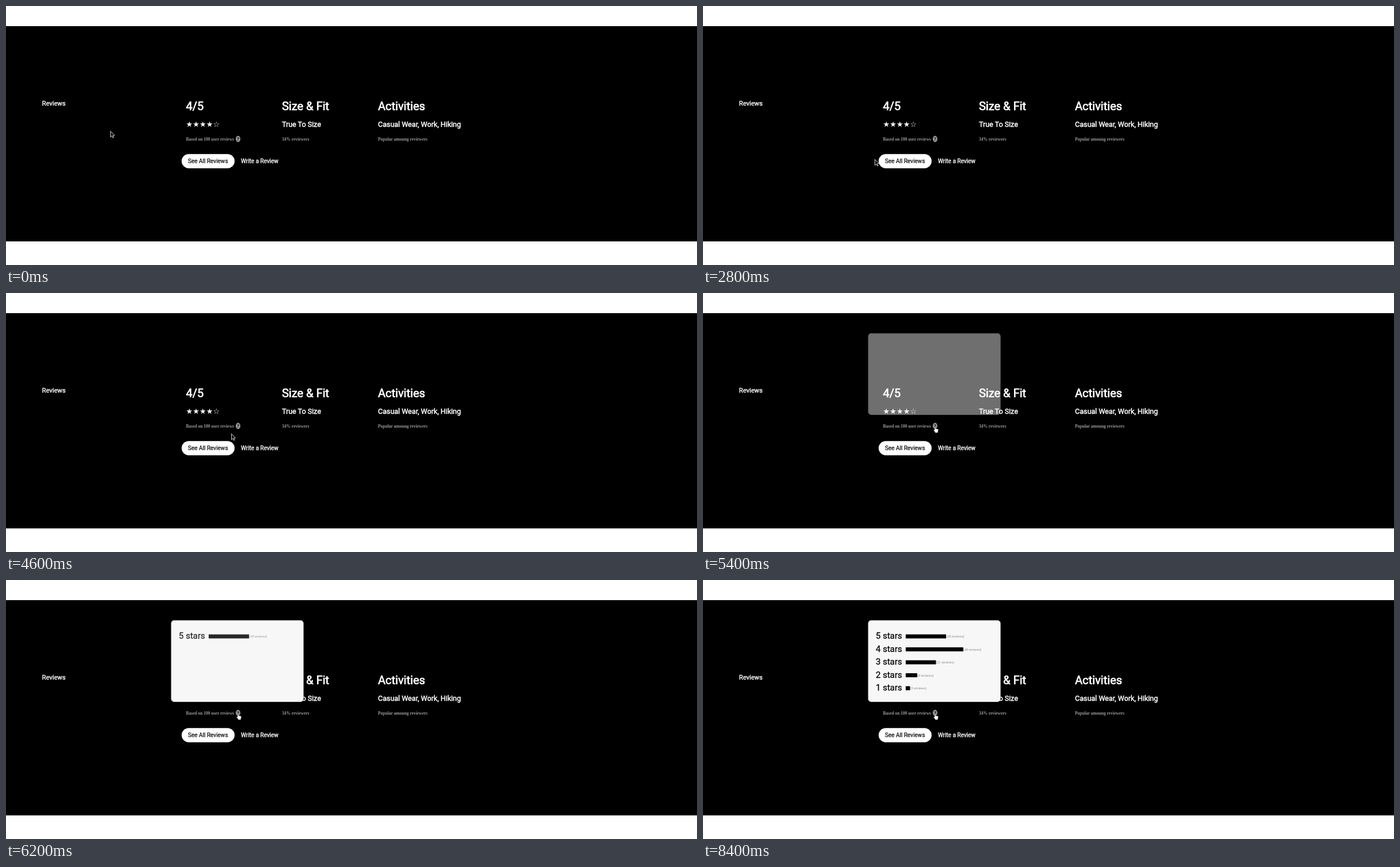
An HTML page for the animation above (9590 ms loop, 1200x450 px).

```html
<!DOCTYPE html>
<html lang="en">
<head>
<meta charset="utf-8">
<title>Reviews</title>
<style>
  html, body { margin: 0; width: 100%; height: 100%; overflow: hidden; background: #fff; }
  svg { display: block; width: 100vw; height: 100vh; }
  text { white-space: pre; }
  .sans { font-family: Roboto, "Liberation Sans", sans-serif; fill: #fff; }
  .bold { stroke: #fff; stroke-width: .036em; }
  .h1 { font-size: 20px; }
  .h2 { font-size: 12.5px; }
  .link { font-size: 10px; }
  .note { font: bold 7.5px "Liberation Serif", serif; fill: #999; }
  .stars { font: 13.1px "DejaVu Sans", sans-serif; fill: #fff; }
  .row { font-size: 15px; fill: #000; stroke: #000; stroke-width: .018em; }
  .count { font: 6.25px "Liberation Serif", serif; fill: #808080; }
</style>
</head>
<body>
<svg id="stage" viewBox="0 0 1200 450">
  <rect y="35" width="1200" height="374"/>
  <text class="sans bold" font-size="11.2" x="62.5" y="173">Reviews</text>

  <text class="sans bold h1" x="312.5" y="181">4/5</text>
  <text class="stars" x="312.5" y="209.5">★★★★☆</text>
  <text class="note" x="312.5" y="233.7">Based on 100 user reviews</text>
  <ellipse cx="403" cy="231" rx="4" ry="5.4" fill="#999"/>
  <text x="403" y="234.2" text-anchor="middle" font-size="9" font-weight="bold" font-family="Liberation Serif, serif">?</text>

  <text class="sans bold h1" x="479.2" y="181">Size &amp; Fit</text>
  <text class="sans bold h2" x="479.2" y="209.5">True To Size</text>
  <text class="note" x="479.2" y="233.7">34% reviewers</text>

  <text class="sans bold h1" x="646" y="181">Activities</text>
  <text class="sans bold h2" x="646" y="209.5">Casual Wear, Work, Hiking</text>
  <text class="note" x="646" y="233.7">Popular amoung reviewers</text>

  <g id="button">
    <rect x="305" y="257.2" width="92" height="24.8" rx="12.4" fill="#fff"/>
    <text class="sans link" x="316" y="273" style="fill:#000;stroke:#000;stroke-width:.02em">See All Reviews</text>
  </g>
  <text class="sans bold link" x="408" y="273">Write a Review</text>

  <g id="popup">
    <rect x="287" y="70.3" width="229.4" height="141.2" rx="5" fill="#f7f7f7" stroke="#ccc" stroke-width=".85"/>
  </g>

  <path id="arrow" d="M.5 .5V10.8L2.9 8.6L4.5 12.1L6.1 11.4L4.6 8H7.6Z" fill="#111" stroke="#ddd" stroke-width=".9"/>
  <path id="hand" d="M-1 7V1.2A1 1 0 0 1 1.1 1.2V4.6L4.8 5.3Q6 5.7 5.9 7.2L5 10.2V12H-.2V10.6L-2.8 7.6Q-2.8 6.2-1 7Z" fill="#fff" stroke="#000" stroke-width=".7"/>
</svg>
<script>
const LOOP = 9590, STEP = 1000 / 15;
const HOVER_ON = 2867, HOVER_OFF = 4200, HOVER_TIME = 250;
const POPUP_AT = 5265, ROWS_AT = 5935, FADE = 500;
const counts = [28, 40, 21, 8, 3];

// time, x, y of the pointer tip
const path = [
  [0, 180.5, 216.5], [867, 180.5, 216.5], [933, 181.5, 216], [1000, 181.5, 215],
  [1200, 181.5, 215], [1700, 205, 188], [2200, 231, 207], [2800, 298, 266],
  [3130, 350, 268], [3550, 350, 268], [4200, 380, 257], [4530, 390, 246],
  [4600, 390.5, 244.3], [5180, 403, 231], [LOOP, 403, 231]
];

const $ = id => document.getElementById(id);
const clamp = v => Math.max(0, Math.min(1, v));

function add(parent, tag, attrs, text = "") {
  const el = document.createElementNS("http://www.w3.org/2000/svg", tag);
  for (const key in attrs) el.setAttribute(key, attrs[key]);
  el.textContent = text;
  parent.append(el);
  return el;
}

const rows = counts.map((count, i) => {
  const y = 22.5 * i, width = count * 2.5;
  const row = add($("popup"), "g", {});
  add(row, "text", { class: "sans row", x: 300, y: 102 + y }, `${5 - i} stars`);
  add(row, "rect", { x: 352, y: 94.5 + y, width, height: 7 });
  add(row, "text", { class: "count", x: 352 + width, y: 100 + y }, `(${count} reviews)`);
  return row;
});

// cubic-bezier(.25, .1, .25, 1), solved by bisection
function ease(v) {
  v = clamp(v);
  if (v === 0 || v === 1) return v;
  const curve = (s, a, b) => 3 * a * s * (1 - s) ** 2 + 3 * b * s * s * (1 - s) + s ** 3;
  let lo = 0, hi = 1;
  for (let i = 0; i < 20; i++) {
    const mid = (lo + hi) / 2;
    if (curve(mid, .25, .25) < v) lo = mid; else hi = mid;
  }
  return curve(lo, .1, 1);
}

// Hermite slope; zero next to a pause
function slope(i, axis) {
  const [a, b, c] = [path[i - 1], path[i], path[i + 1]];
  const still = (p, q) => p[1] === q[1] && p[2] === q[2];
  if (!a || !c || still(a, b) || still(b, c)) return 0;
  return (c[axis] - a[axis]) / (c[0] - a[0]);
}

function pointer(t) {
  const i = Math.max(0, path.findIndex(p => p[0] > t) - 1);
  const a = path[i], b = path[i + 1], span = b[0] - a[0], s = (t - a[0]) / span;
  return [1, 2].map(axis =>
    a[axis] + (b[axis] - a[axis]) * s * s * (3 - 2 * s) +
    span * s * (1 - s) * ((1 - s) * slope(i, axis) - s * slope(i + 1, axis)));
}

function draw(time) {
  const t = Math.floor((time + 4) / STEP) * STEP;
  const [x, y] = pointer(Math.min(t, LOOP - 1));

  const overButton = t >= HOVER_ON && t < HOVER_OFF;
  const overHelp = Math.hypot((x - 403) / 4, (y - 231) / 5.4) < 1;
  const pointing = overButton || overHelp;
  $("arrow").setAttribute("visibility", pointing ? "hidden" : "visible");
  $("hand").setAttribute("visibility", pointing ? "visible" : "hidden");
  for (const id of ["arrow", "hand"])
    $(id).setAttribute("transform", `translate(${Math.round(x)} ${Math.round(y)})`);

  const grow = ease((t - HOVER_ON) / HOVER_TIME) - ease((t - HOVER_OFF) / HOVER_TIME);
  $("button").setAttribute("transform",
    `translate(351 269.6) scale(${1 + .055 * grow}) translate(-351 -269.6)`);

  $("popup").setAttribute("opacity", ease((t - POPUP_AT) / FADE));
  rows.forEach((row, i) =>
    row.setAttribute("opacity", t >= 8395 ? 1 : ease((t - ROWS_AT - i * FADE) / FADE)));
}

const start = performance.now();
function tick() {
  draw((performance.now() - start) % LOOP);
  requestAnimationFrame(tick);
}
tick();
</script>
</body>
</html>
```
